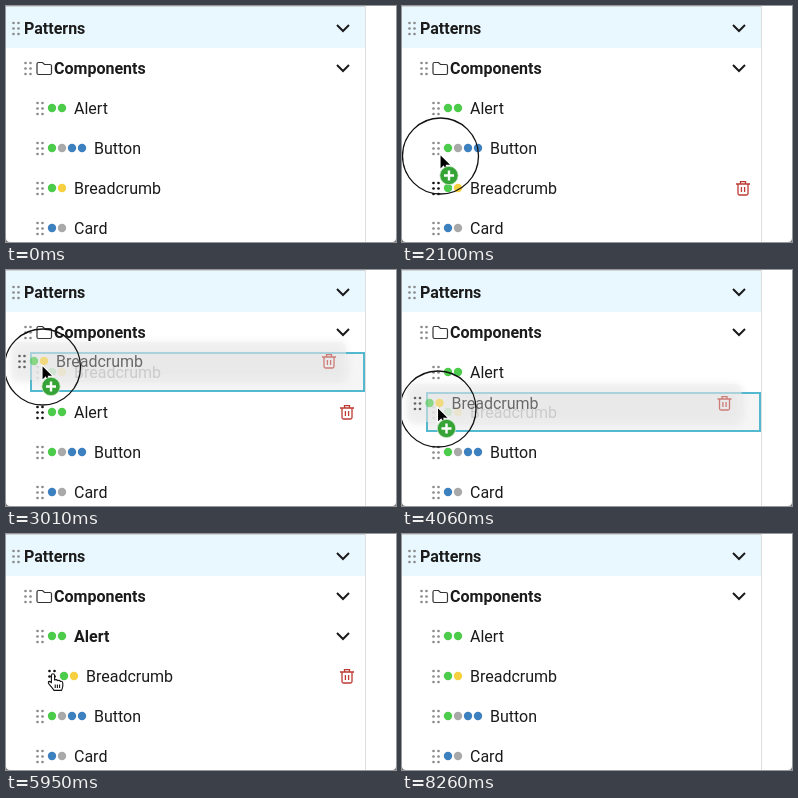
Animation, 390 px wide and 236 px high, one loop 9.38 s. Source, as an HTML page:

```html
<!DOCTYPE html>
<html lang="en">
<head>
<meta charset="utf-8">
<title>Sortable pattern tree</title>
<style>
  html, body { margin: 0; width: 100%; height: 100%; overflow: hidden; background: #fff; }
  svg { display: block; width: 390px; height: 236px; }
  text { font: 16px Roboto, Arial, sans-serif; fill: #1b1b1b; }
  .bold { font-weight: 700; }
</style>
</head>
<body>
<svg viewBox="0 0 390 236" xmlns="http://www.w3.org/2000/svg">
  <defs>
    <filter id="soft" x="-10%" y="-60%" width="120%" height="220%">
      <feGaussianBlur stdDeviation="4"/>
    </filter>
  </defs>
  <rect width="390" height="236" fill="#fff"/>
  <rect y="1" width="359" height="41" fill="#e9f8ff"/>
  <path d="M0 .5H359" stroke="#cfd3d5"/>
  <path d="M359.5 0V236" stroke="#dedede"/>
  <path d="M0 232Q0 236 4 236H0ZM390 232Q390 236 386 236H390Z" fill="#777"/>
  <g id="scene"></g>
</svg>
<script>
const LOOP = 9380, STEP = 70;
const scene = document.getElementById('scene');
const hues = { g: '#4dcb4b', y: '#f6d03f', b: '#3d80bf', n: '#a9a9a9' };
const dots = { Alert: 'gg', Button: 'gnbb', Breadcrumb: 'gy', Card: 'bn' };
const MOVED = 'Breadcrumb';

// Pointer tip: time, x, y
const path = [
  [560, 62, 212], [840, 46, 128], [1190, 32, 184], [1820, 32, 184],
  [2100, 38, 148], [2450, 37, 112], [2800, 36, 94], [3010, 36, 95],
  [3360, 36, 98], [3780, 36, 124], [4060, 35.5, 137], [4410, 39, 141],
  [4690, 42, 143], [5040, 44, 182], [5600, 44, 182], [5950, 47, 140],
  [6230, 47, 140], [6580, 30, 139.5], [7000, 30, 139.5], [7140, 30, 141],
  [7560, 41, 197], [8050, 41, 197], [8260, 46, 240]
];

// Tree layout: start time, slot of the moved row, nested, held
const layouts = [
  [0, 2, 0, 0], [2170, 2, 0, 1], [2310, 1, 0, 1], [2660, 0, 0, 1],
  [3500, 1, 0, 1], [4410, 1, 1, 1], [4760, 1, 1, 0],
  [6440, 1, 1, 1], [6510, 1, 0, 1], [7140, 1, 0, 0]
];

const within = (t, a, b) => t >= a && t < b;

function pointer(t) {
  const i = path.findIndex(p => p[0] > t);
  const [t0, x0, y0] = path[i - 1], [t1, x1, y1] = path[i];
  const u = (t - t0) / (t1 - t0), e = u * u * (3 - 2 * u);
  return [x0 + (x1 - x0) * e, y0 + (y1 - y0) * e];
}

function grip(x, y, color = '#8b8b8b') {
  let s = '';
  for (let i = 0; i < 6; i++)
    s += `<circle cx="${x + i % 2 * 5}" cy="${y - 5 + (i >> 1) * 5.5}" r="1.35" fill="${color}"/>`;
  return s;
}

const label = (x, y, str, bold) =>
  `<text x="${x}" y="${y + 6}"${bold ? ' class="bold"' : ''}>${str}</text>`;

const chevron = y =>
  `<path d="M331 ${y - 3}l6 6 6-6" fill="none" stroke="#1b1b1b" stroke-width="2"/>`;

const folder = (x, y) =>
  `<path d="M${x + 1.5} ${y - 5.5}h4l2 2h5.5q1.5 0 1.5 1.5v7q0 1.5-1.5 1.5h-11.5q-1.5 0-1.5-1.5v-9q0-1.5 1.5-1.5z"
    fill="none" stroke="#333" stroke-width="1.2"/>`;

const trash = y =>
  `<g transform="translate(334 ${y - 7})" fill="none" stroke="#bd3a32" stroke-width="1.3">
    <path d="M0 3H14M4.5 3V.7H9.5V3M2 3V12.5Q2 14 3.5 14H10.5Q12 14 12 12.5V3M5.4 6V11M8.6 6V11"/></g>`;

function row(name, y, { nested = 0, hover, parent } = {}) {
  const dx = nested ? 12 : 0, marks = dots[name];
  let s = grip(31.5 + dx, y, hover ? '#111' : undefined);
  [...marks].forEach((c, i) => {
    s += `<circle cx="${46 + dx + i * 10}" cy="${y}" r="4.2" fill="${hues[c]}"/>`;
  });
  s += label(48 + dx + marks.length * 10, y, name, parent);
  if (parent) s += chevron(y);
  if (hover) s += trash(y);
  return s;
}

function slotBox(y, nested) {
  const x = nested ? 37 : 25;
  return `<rect x="${x}" y="${y - 19}" width="${358 - x}" height="38" fill="#f5f5f5" stroke="#52b9d0" stroke-width="2"/>
    <g opacity=".35">${row(MOVED, y, { nested })}</g>`;
}

function ghost(x, y, nested) {
  const left = nested ? 36 : 24;
  const dx = nested ? x - 81 : x - 54, dy = y + (nested ? 2 : -4);
  return `<g transform="translate(${dx} ${dy})">
    <rect x="${left}" y="-18" width="${358 - left}" height="38" rx="6" fill="#999" opacity=".2" filter="url(#soft)"/>
    <rect x="${left}" y="-19" width="${358 - left}" height="38" rx="5" fill="#f1f1f1" opacity=".5"/>
    <g opacity=".62">${row(MOVED, 0, { nested, hover: true })}</g></g>`;
}

const hand = (x, y) =>
  `<path transform="translate(${x} ${y})" d="M-1.6 1.4Q-1.4-.2 0-.2T1.6 1.4V6Q3.6 5 4.6 6.6 6.6 5.8 7.4 7.4 9.8 6.8 9.8 9.4V12Q9.6 14 8.6 16.4H1Q-.8 13.6-4.4 9.6-5.2 8.2-3.8 7.6-2.6 7.4-1.6 8.8Z M2.2 10.5V14M4.4 10.5V14M6.6 10.5V14"
    fill="#fff" stroke="#111" stroke-width="1.1" stroke-linejoin="round"/>`;

const arrow = (x, y) =>
  `<g transform="translate(${x} ${y})">
    <path d="M0 0V15.6L3.6 12.2 6 17.8 8.8 16.6 6.4 11.2H11.2Z" fill="#000" stroke="#fff" stroke-width="1.1"/>
    <circle cx="9" cy="21.5" r="9.2" fill="#35a335" stroke="#d8ecd6" stroke-width=".8"/>
    <path d="M9 16.5v10M4 21.5h10" stroke="#fff" stroke-width="2.4"/></g>`;

const ring = (x, y, r) =>
  `<circle cx="${x + .5}" cy="${y + 2}" r="${r}" fill="none" stroke="#111" stroke-width="1.3"/>`;

function draw(t) {
  const [, slot, nested, held] = layouts.filter(l => l[0] <= t).pop();
  const names = ['Alert', 'Button', 'Card'];
  names.splice(slot, 0, MOVED);
  const shown = within(t, 560, 8260);
  const [x, y] = shown ? pointer(t) : [0, 0];
  const press = within(t, 1470, 4760) ? 1820 : within(t, 6090, 7000) ? 6230 : 0;
  const drag = press && t >= press;

  let over = '';
  if (held) over = slot === 0 ? 'Alert' : '';
  else if (drag) over = MOVED;
  else if (shown) over = names[Math.floor((y - 82) / 40)];

  let s = grip(7.5, 22) + label(18, 22, 'Patterns', true) + chevron(22)
    + grip(19.5, 62) + folder(31, 62) + label(48, 62, 'Components', true) + chevron(62);
  names.forEach((name, i) => {
    const cy = 102 + 40 * i, mine = name === MOVED;
    s += mine && held ? slotBox(cy, nested)
      : row(name, cy, { nested: mine && nested, hover: name === over, parent: nested && name === 'Alert' });
  });
  if (held) s += ghost(x, y, t > 6000);
  if (press) s += ring(x, y, 24 + 14 * Math.min(1, Math.max(0, (t - press) / 140)));
  if (shown) s += drag ? arrow(x, y) : hand(x, y);
  scene.innerHTML = s;
}

let start, last = -1;
function tick(now) {
  start ??= now;
  const t = Math.floor((now - start) % LOOP / STEP) * STEP;
  if (t !== last) draw(last = t);
  requestAnimationFrame(tick);
}
draw(0);
requestAnimationFrame(tick);
</script>
</body>
</html>
```
